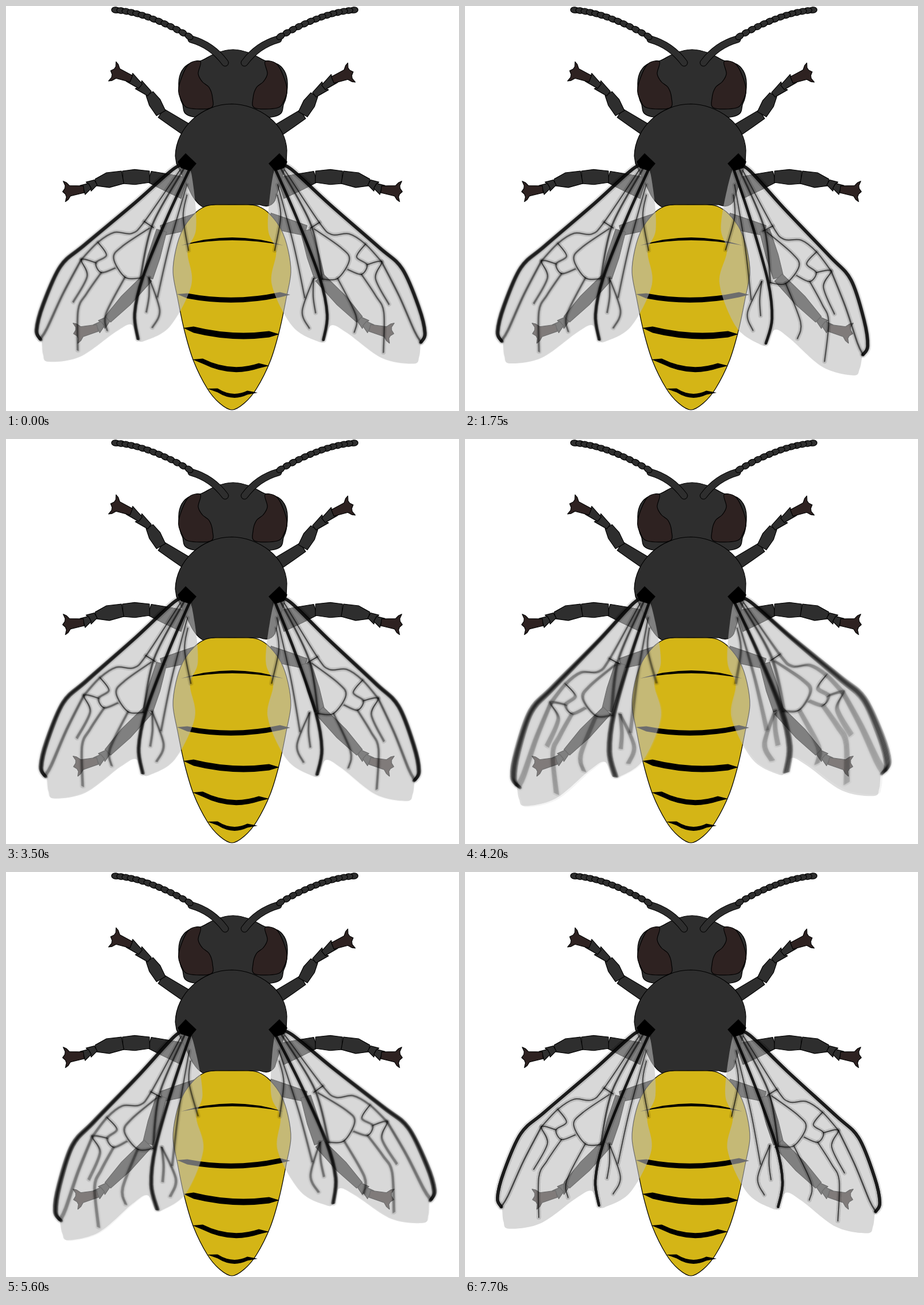
An HTML page with a canvas that plays this animation: 792x707 px, repeating every 8000 ms.

```html
<!DOCTYPE html>
<html lang="en">
<head>
<meta charset="utf-8">
<title>Bee</title>
<style>
html, body { margin: 0; width: 792px; height: 707px; overflow: hidden; background: #fff; }
canvas { display: block; }
</style>
</head>
<body>
<canvas id="stage" width="792" height="707"></canvas>
<script>
const ctx = document.getElementById('stage').getContext('2d');
const DARK = '#2e2e2e', BROWN = '#2e2221', YELLOW = '#d4b516';
const LOOP = 8000, HOLD = 350, GHOSTS = 9;
const PIVOT = [474, 272];

// Turning points of the flutter: step, left and right turn in degrees.
const swings = [
  [0, 5.8, 4.2], [3, -4.6, 10.9], [5, 5.1, -1], [7, 0, 1.3], [9, 6.2, .6], [12, -1, 6.5],
  [13, 6, -2], [14, 1, -1.8], [15, -3.2, 9.8], [18, 5.4, 2.4], [22, 4.9, 3]
];

function swing(step, side) {
  const next = Math.max(1, swings.findIndex(s => s[0] >= step));
  const a = swings[next - 1], b = swings[next];
  const ease = (1 - Math.cos(Math.PI * (step - a[0]) / (b[0] - a[0]))) / 2;
  return a[side] + (b[side] - a[side]) * ease;
}

const points = text => text.split(' ').map(p => p.split(',').map(Number));

// Smooth curve through all points.
function curve(p, closed) {
  const n = p.length, path = new Path2D();
  const at = i => closed ? p[(i + n) % n] : p[Math.max(0, Math.min(n - 1, i))];
  path.moveTo(...p[0]);
  for (let i = 0; i < n - (closed ? 0 : 1); i++) {
    const [a, b, c, d] = [at(i - 1), at(i), at(i + 1), at(i + 2)];
    path.bezierCurveTo(b[0] + (c[0] - a[0]) / 6, b[1] + (c[1] - a[1]) / 6,
      c[0] - (d[0] - b[0]) / 6, c[1] - (d[1] - b[1]) / 6, c[0], c[1]);
  }
  if (closed) path.closePath();
  return path;
}

function symmetric(text, axis) {
  const half = points(text);
  const other = half.filter(p => p[0] !== axis).map(([x, y]) => [2 * axis - x, y]);
  return curve([...half, ...other.reverse()], true);
}

function shape(path, fill) {
  ctx.fillStyle = fill;
  ctx.fill(path);
  ctx.stroke(path);
}

function mirrored(sum, drop, draw) {
  ctx.save();
  ctx.transform(-1, 0, 0, 1, sum, drop);
  draw();
  ctx.restore();
}

function bothSides(sum, drop, draw) {
  draw();
  mirrored(sum, drop, draw);
}

// Local frame with x running from a to b; draw receives the length.
function along([ax, ay], [bx, by], draw) {
  ctx.save();
  ctx.translate(ax, ay);
  ctx.rotate(Math.atan2(by - ay, bx - ax));
  draw(Math.hypot(bx - ax, by - ay));
  ctx.restore();
}

function polygon(list, fill) {
  const path = new Path2D();
  list.forEach(p => path.lineTo(...p));
  path.closePath();
  shape(path, fill);
}

// Each joint is x, y, half width; the last two joints carry foot and claw.
const legs = [
  [790, 2, '316,216,11 271,187,9 251,153,7 219,127,5 183,113,0'],
  [792, 0, '312,318,19 251,298,10 204,299,11 157,308,6 136,320,4 99,324,0'],
  [796, 0, '336,374,13 272,392,9 248,474,9 178,547,7 160,562,4 118,572,0']
].map(([sum, drop, text]) => [sum, drop, points(text)]);

function drawLeg(joints) {
  const last = joints.length - 2;
  for (let i = 0; i < last; i++) {
    const w = joints[i][2], v = joints[i + 1][2];
    along(joints[i], joints[i + 1], len => {
      if (i === last - 1) {
        for (const k of [0, .5]) polygon([[len * k, -5], [len * (k + .6), -9], [len * (k + .5), 0], [len * (k + .6), 9], [len * k, 5]], DARK);
      } else {
        const bulge = i ? Math.max(w, v) * 1.2 : (w + v) / 2;
        polygon([[0, -w], [len * .55, -bulge], [len, -v], [len, v], [len * .55, bulge], [0, w]], DARK);
      }
    });
  }
  along(joints[last], joints[last + 1], len => {
    const top = [[0, -6], [len * .65, -9], [len * .78, -15], [len * .92, -18], [len * .85, -10], [len * .88, -5]];
    polygon([...top, [len, 0], ...top.map(([x, y]) => [x, -y]).reverse()], BROWN);
  });
}

const scape = new Path2D('M324 58Q360 68 383 99');
function drawAntenna() {
  for (const [width, color] of [[13, '#000'], [11, DARK]]) {
    ctx.lineWidth = width;
    ctx.strokeStyle = color;
    ctx.stroke(scape);
  }
  ctx.lineWidth = 1.2;
  ctx.strokeStyle = '#000';
  for (let i = 0; i < 14; i++) {
    const t = i / 13, u = 1 - t;
    const x = 192 * u * u + 500 * u * t + 320 * t * t;
    const y = 7 * u * u + 24 * u * t + 53 * t * t;
    const segment = new Path2D();
    segment.ellipse(x, y, 7.5, 5.2, Math.atan2(5 * u + 41 * t, 58 * u + 70 * t), 0, 7);
    shape(segment, DARK);
  }
}

const head = symmetric('397,76 368,82 342,95 318,102 305,118 302,142 308,170 330,194', 397);
const eye = curve(points('340,97 318,103 302,142 307,165 319,178 358,178 361,160 355,142 343,132 336,118'), true);
const thorax = new Path2D('M395 171C342 171 297 213 296 262L298 275L325 330Q338 352 352 353L366 347H444Q462 354 470 340L490 275L491 252C489 205 442 172 395 171Z');
const abdomen = symmetric('395,347 366,347 348,350 329,363 309,390 297,425 292,465 300,510 312,567 328,620 352,668 373,693 395,705', 395);

// Band from one edge to the other; mid is its upper edge at the centre.
function drawStripe(x0, y0, x1, y1, mid, thick, blunt) {
  const middle = (x0 + x1) / 2, level = (y0 + y1) / 2, half = thick / 2 * blunt;
  const a = x0 + 18 * blunt, b = x1 - 18 * blunt;
  const top = 2 * mid - level + half, low = 2 * (mid + thick) - level - half;
  ctx.fillStyle = '#000';
  ctx.fill(new Path2D(`M${x0} ${y0}L${a} ${y0 - half + 3 * blunt}Q${middle} ${top} ${b} ${y1 - half}L${x1} ${y1}L${b} ${y1 + half}Q${middle} ${low} ${a} ${y0 + half + 3 * blunt}Z`));
}

function drawBody() {
  ctx.lineWidth = 1.2;
  ctx.strokeStyle = '#000';
  ctx.lineJoin = ctx.lineCap = 'round';
  for (const [sum, drop, joints] of legs) bothSides(sum, drop, () => drawLeg(joints));
  shape(head, DARK);
  bothSides(793, 0, () => shape(eye, BROWN));
  bothSides(800, 0, drawAntenna);
  shape(thorax, DARK);
  shape(abdomen, YELLOW);
  drawStripe(306, 418, 485, 418, 404, 5, 0);
  drawStripe(299, 503, 497, 504, 508, 9, 1);
  drawStripe(310, 562, 478, 573, 569, 11, 1);
  drawStripe(326, 617, 460, 628, 629, 9, 1);
  drawStripe(352, 668, 440, 675, 676, 7, 1);
}

const film = curve(points('474,275 496,284 560,352 640,435 674,473 707,560 709,592 700,606 695,630 684,642 630,628 572,579 546,564 533,588 520,590 478,560 448,485 460,428 449,388 459,320'), true);
const veins = [
  [5.5, '476,277 498,287 560,353 640,434 678,475 702,545 709,590 701,605'],
  [2.5, '643,460 669,522 691,585 701,605'],
  [4.5, '470,285 501,373 533,480 541,545 531,588'],
  [3, '480,285 525,387 537,482'],
  [2, '486,287 540,384 560,406 590,407 617,427 643,460'],
  [2, '523,392 540,383'],
  [2, '530,394 574,430 587,452 564,483 537,482'],
  [2, '617,427 600,448 617,463 606,479 583,469'],
  [2, '617,463 643,460 630,488 650,535'],
  [2, '606,479 628,518 640,548 634,618'],
  [2, '564,483 591,550 586,579'],
  [2, '470,330 473,368 458,426'],
  [2, '472,312 492,420 504,512'],
  [2, '522,480 498,535 508,566'],
  [2, '522,480 519,512 521,540']
].map(([width, text]) => [width, curve(points(text))]);
const hinge = new Path2D('M478 257L492 272L486 283L470 288L459 275Z');

function turned(degrees, draw) {
  ctx.save();
  ctx.translate(...PIVOT);
  ctx.rotate(-degrees * Math.PI / 180);
  ctx.translate(-PIVOT[0], -PIVOT[1]);
  draw();
  ctx.restore();
}

// The film runs a little ahead of the veins, which smear towards it.
function drawWing(step, side) {
  const now = swing(step, side), ahead = swing(Math.min(step + 1, 22), side);
  const mix = k => now + (ahead - now) * .2 * k;
  for (const [k, alpha] of [[1, .5], [.6, .16]]) turned(mix(k), () => {
    ctx.globalAlpha = alpha;
    ctx.fillStyle = '#bcbcbc';
    ctx.fill(film);
  });
  ctx.strokeStyle = '#000';
  for (let i = 0; i < GHOSTS; i++) turned(mix(i / (GHOSTS - 1)), () => {
    for (const [width, path] of veins) {
      ctx.globalAlpha = .014;
      ctx.lineWidth = width + 6;
      ctx.stroke(path);
      ctx.globalAlpha = width > 4 ? .2 : .1;
      ctx.lineWidth = width;
      ctx.stroke(path);
    }
  });
  ctx.globalAlpha = 1;
  ctx.fillStyle = '#000';
  ctx.fill(hinge);
}

function drawPose(step) {
  ctx.fillStyle = '#fff';
  ctx.fillRect(0, 0, 792, 707);
  drawBody();
  drawWing(step, 2);
  mirrored(792, 0, () => drawWing(step, 1));
}

const start = performance.now();
let shown = -1;
function tick() {
  const step = Math.floor((performance.now() - start) % LOOP / HOLD);
  if (step !== shown) drawPose(shown = step);
  requestAnimationFrame(tick);
}
tick();
</script>
</body>
</html>
```
